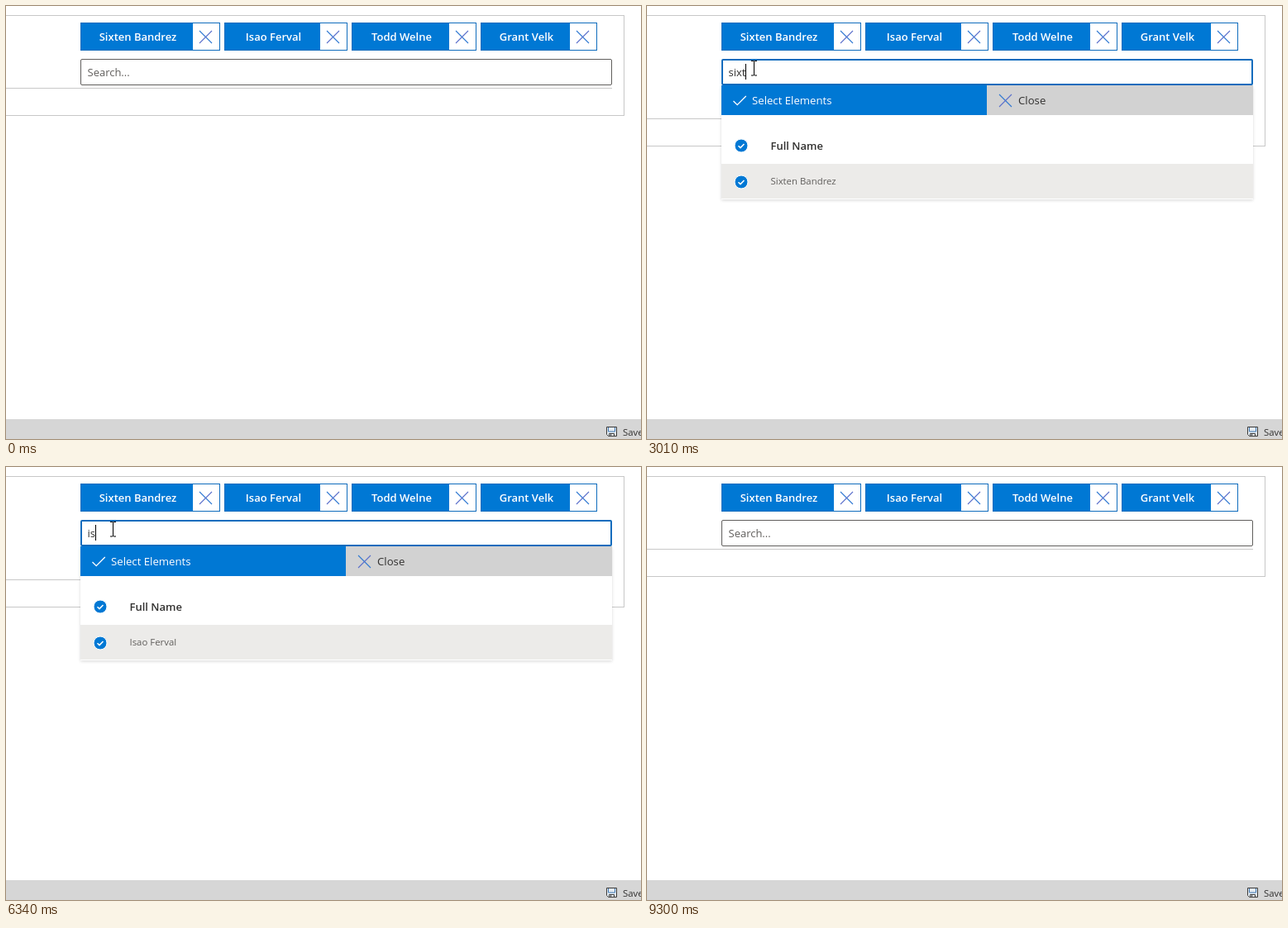
An HTML page for the animation above (10 s loop, 768x524 px).

```html
<!DOCTYPE html>
<html lang="en">
<head>
<meta charset="utf-8">
<title>People picker</title>
<style>
  html, body { margin: 0; width: 100%; height: 100%; overflow: hidden; background: #fff; }
  #stage { position: relative; width: 768px; height: 524px; overflow: hidden; background: #fff;
    font: 13px/20px "Open Sans", "Noto Sans", sans-serif; color: #323130; white-space: nowrap; }
  #stage div, #stage svg { position: absolute; box-sizing: border-box; }
  #panel { left: -9px; top: 11px; width: 757px; border: 1px solid #c8c8c8; }
  #rule { left: 0; width: 733px; height: 1px; background: #c8c8c8; }
  .chip { top: 20px; height: 34px; border: 1px solid #0f6cbd; background: #fff; }
  .chip b { display: block; height: 32px; background: #0078d4; color: #fff; font-weight: 600;
    line-height: 32px; text-align: center; text-indent: 2px; }
  .chip svg { right: 8px; top: 8px; }
  #field { left: 90px; top: 64px; width: 643px; height: 32px; border: 1px solid #605e5c;
    border-radius: 2px; background: #fff; }
  #field.focus { border: 2px solid #0f6cbd; }
  #entry { left: 98.5px; top: 70px; }
  #hint { left: 98.5px; top: 70px; color: #605e5c; }
  #caret { display: inline-block; width: 1px; height: 19px; background: #000; vertical-align: top; }
  #drop { left: 90px; top: 96px; width: 643px; background: #fff;
    box-shadow: 0 1.6px 3.6px rgba(0,0,0,.14), 0 .3px 1px rgba(0,0,0,.11); }
  #drop > * { position: relative !important; }
  #tools { height: 36px; font-size: 13.2px; line-height: 36px; }
  #pick { left: 0; width: 321px; height: 36px; padding-left: 37px; background: #0078d4; color: #fff; }
  #close { left: 321px; width: 322px; height: 36px; padding-left: 38px; background: #d2d2d2; }
  #close.over { background: #edebe9; }
  #head { height: 59px; padding: 27px 0 0 59.5px; font-weight: 600; }
  .row { height: 43px; padding: 11px 0 0 59.5px; font-size: 11.4px; color: #605e5c;
    border-bottom: 1px solid #f0efee; }
  .row.on { background: #ecebe9; border-color: #fff; }
  #bar { left: 0; top: 500px; width: 768px; height: 24px; background: #d6d6d6; }
  #bar span { position: absolute; left: 746px; top: 6px; font-size: 11.4px; }
  #glow { width: 24px; height: 24px; margin: -12px; border-radius: 50%; background: #f4f06c; }
  .cursor { overflow: visible; width: 1px; height: 1px; }
</style>
</head>
<body>
<div id="stage">
  <div id="panel"></div>
  <div id="rule"></div>
  <div id="chips"></div>
  <div id="field"></div>
  <div id="hint">Search...</div>
  <div id="entry"><span id="typed"></span><span id="caret"></span></div>
  <div id="bar">
    <svg style="left:726px;top:8px" width="14" height="14" fill="none" stroke="#3b3a39">
      <path d="M.5 1.5h12v11h-10l-2-2z" fill="#e4ebf2"/>
      <path d="M2.5 2v5h8V2" stroke="#3f77b0"/><path d="M3.5 12V9.500h6V12M5.500 10v2"/>
    </svg>
    <span>Save</span>
  </div>
  <div id="drop">
    <div id="tools">
      <div id="pick"><svg style="left:14px;top:12px" width="17" height="14" fill="none"
        stroke="#fff" stroke-width="1.3"><path d="M.5 7l4.700 4.700L15.800 1"/></svg>Select Elements</div>
      <div id="close">Close</div>
    </div>
    <div id="head">Full Name</div>
  </div>
  <div id="glow"></div>
  <svg class="cursor" id="beam"><path d="M-3.500-8.500h3l.5.5.5-.5h3M0-8V8.500M-3.500 9h3l.5-.5.5.5h3"
    transform="translate(.5)" fill="none" stroke="#000"/></svg>
  <svg class="cursor" id="hand"><path d="M-1 2.200C-1 0 2.200 0 2.200 2.200V8c.5-1.300 3-1 3 .7
    .5-1.300 2.900-.9 2.900.8.6-1.100 2.700-.7 2.700 1V16c0 2-1.600 3.200-1.600 5.500V23H.5v-2
    C-.8 18.500-3 16.500-5 13.500c-1.300-2 .7-3.300 2.200-1.800L-1 13.500z"
    fill="#fff" stroke="#000" stroke-linejoin="round"/><path d="M2.200 8v4M5.200 9v3.500M8.100 10v3"
    stroke="#000"/></svg>
  <svg class="cursor" id="arrow"><path d="M.5.700V16.500l3.700-3.600 2.400 5.600 2.300-1-2.400-5.400h5.200z"
    fill="#fff" stroke="#000"/></svg>
</div>
<script>
const LOOP = 10000, TICK = 78, FILTER_DELAY = 230;
const $ = id => document.getElementById(id);
const people = ['Sixten Bandrez', 'Isao Ferval', 'Todd Welne', 'Grant Velk',
  'Contact Contact', 'Madeleine Tolbe', 'Damaro Pelch'];
const chips = [[90, 169], [264, 149], [418, 151], [574, 141]];

// [time, entry text]
const keys = [[0, ''], [2080, 's'], [2230, 'si'], [2380, 'six'], [3010, 'sixt'], [3160, 'sixte'],
  [3390, 'sixten'], [4090, 'sixte'], [4320, 'sixt'], [4550, 'six'], [4720, 'si'], [4870, 's'],
  [5100, ''], [5560, 'i'], [6110, 'is'], [6510, 'isa'], [6890, 'isao'], [8680, '']];
const caretOn = [[980, 1530], [2080, 3940], [4400, 7440], [7910, 8520]];
const clicks = [[980, 1060], [8520, 8680]];
const focus = [[980, 8520]], open = [[2310, 8680]], pointer = [[360, 9300]];

// [start time, steps, from, to]
const moves = [
  [360, 7, [560, 462], [129, 75]],
  [8140, 4, [129, 75], [519, 120]],
  [8752, 6, [519, 120], [712, 506]]
];

const during = (spans, t) => spans.some(([a, b]) => t >= a && t < b);
const entryAt = t => keys.filter(k => k[0] <= t).pop()[1];
const ease = p => p * p * (3 - 2 * p);
const show = (el, on) => { el.style.display = on ? '' : 'none'; };

function pointerAt(t) {
  const [start, steps, from, to] = moves.filter(m => m[0] <= t).pop() || moves[0];
  const p = ease(Math.max(0, Math.min(1, Math.floor((t - start) / TICK) / steps)));
  return from.map((v, i) => Math.round(v + (to[i] - v) * p));
}

const cross = pos => `<svg style="${pos}" width="17" height="17" fill="none" stroke-width="1.100">
  <path d="M1 1l15 15" stroke="#2f78d2"/><path d="M16 1L1 16" stroke="#5a6fcb"/></svg>`;
const tick = (x, y) => `<svg style="left:${x}px;top:${y}px" width="18" height="18" fill="none">
  <circle cx="9" cy="9" r="8" fill="#0078d4" stroke="#fff"/>
  <path d="M5.500 9.200l2.500 2.400 4.500-4.700" stroke="#fff" stroke-width="1.500"/></svg>`;

$('chips').innerHTML = chips.map(([x, w], i) =>
  `<div class="chip" style="left:${x}px;width:${w}px"><b style="width:${w - 34}px">${people[i]}</b>${cross('')}</div>`).join('');
$('close').insertAdjacentHTML('beforeend', cross('left:14px;top:10px'));
$('head').insertAdjacentHTML('beforeend', tick(15, 28));
$('drop').insertAdjacentHTML('beforeend', people.map((name, i) =>
  `<div class="row${i < 4 ? ' on' : ''}">${name}${i < 4 ? tick(15, 13) : ''}</div>`).join(''));
const rows = [...document.querySelectorAll('.row')];
const headTick = $('head').querySelector('svg');

function draw(t) {
  const text = entryAt(t), query = entryAt(t - FILTER_DELAY < 0 ? 0 : t - FILTER_DELAY);
  const isOpen = during(open, t);
  const shift = isOpen ? 37 : 0;
  $('panel').style.height = 122 + shift + 'px';
  $('rule').style.top = 99 + shift + 'px';
  $('field').className = during(focus, t) ? 'focus' : '';
  $('typed').textContent = text;
  show($('hint'), !text);
  show($('caret'), during(caretOn, t));

  show($('drop'), isOpen);
  let allOn = true;
  rows.forEach((row, i) => {
    const match = people[i].toLowerCase().includes(query);
    show(row, match);
    if (match && i > 3) allOn = false;
  });
  show(headTick, allOn);

  const [x, y] = pointerAt(t), seen = during(pointer, t);
  const inField = x > 90 && x < 733 && y > 64 && y < 96;
  const onTools = isOpen && x > 90 && x < 733 && y >= 96 && y < 132;
  $('close').className = onTools && x > 411 ? 'over' : '';
  const shape = inField ? 'beam' : onTools ? 'hand' : 'arrow';
  for (const id of ['beam', 'hand', 'arrow', 'glow']) {
    const el = $(id);
    el.style.left = x + 'px';
    el.style.top = y + 'px';
    show(el, id === 'glow' ? during(clicks, t) : seen && id === shape);
  }
}

const start = performance.now();
function loop() {
  draw((performance.now() - start) % LOOP);
  requestAnimationFrame(loop);
}
loop();
</script>
</body>
</html>
```
